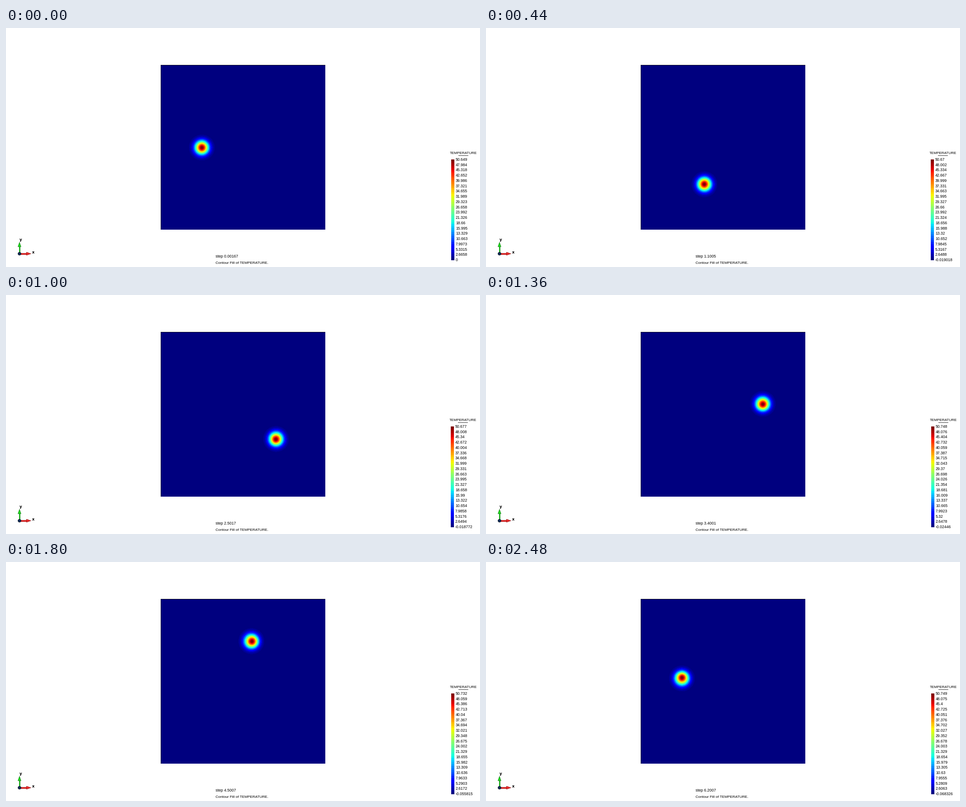
Write a matplotlib script that moves like this. It is 1054x531 px and loops after 2520 ms.

```python
import math

import matplotlib.pyplot as plt
import numpy as np
from matplotlib.animation import FuncAnimation
from matplotlib.colors import ListedColormap
from matplotlib.patches import Circle, Polygon, Rectangle
from matplotlib.transforms import Affine2D

W, H, DPI = 1054, 531, 100
FRAMES, INTERVAL = 63, 40

# Domain, orbit and blob size in pixels
LEFT, TOP, SIDE = 344, 82, 366
CX, CY = LEFT + SIDE / 2, TOP + SIDE / 2 + 0.5
ORBIT = SIDE / 4
SIGMA = 0.05606 * SIDE / 2

DT = 0.00167
LEVELS, LABELS = 50, 20
BAR_X, BAR_TOP, BAR_H = 990, 292, 223.5

# Extremes of the field at a few moments of the run
KEYS = [0, 6, 17, 25, 34, 45, 62]
MAXIMA = [50.6494, 50.6369, 50.7101, 50.6766, 50.7483, 50.732, 50.7492]
MINIMA = [0, -0.0067714, -0.033715, -0.018772, -0.02446, -0.055815, -0.068326]

plt.rcParams["font.family"] = "Liberation Sans"
jet = ListedColormap(plt.get_cmap("jet")(np.linspace(0, 1, LEVELS)))

fig = plt.figure(figsize=(W / DPI, H / DPI), dpi=DPI, facecolor="white")
ax = fig.add_axes([0, 0, 1, 1])
ax.axis("off")

px, py = np.meshgrid(LEFT + np.arange(SIDE) + 0.5, TOP + np.arange(SIDE) + 0.5)


def sim_time(i):
    """First solver step at or after each tenth of a second."""
    return max(1, math.ceil(i * 0.1 / DT - 1e-9)) * DT


def field(t):
    """Rotating Gaussian whose peak slowly falls behind its rim."""
    c, s = math.cos(t), math.sin(t)
    dx = px - (CX - ORBIT * c)
    dy = py - (CY + ORBIT * s)
    along, across = dx * s + dy * c, dx * c - dy * s
    g = np.exp(-(along**2 + across**2) / (2 * SIGMA**2))
    along = along + 0.9 * t / (2 * math.pi) * (2 * g - 0.8)
    return np.exp(-(along**2 + across**2) / (2 * SIGMA**2))


def label(x, y, s, size=8.4, **kw):
    return ax.text(x, y, s, fontsize=size * 72 / DPI, color="black",
                   va="baseline", **kw)


def box(x, y, w, h, color, **kw):
    ax.add_patch(Rectangle((x, y), w, h, fc=color, ec="none",
                           antialiased=False, **kw))


def arrow(dx, dy, color, edge):
    """Axis arrow from the triad origin along a unit direction."""
    def pt(a, b):
        return 30 + a * dx - b * dy, 501.5 + a * dy + b * dx

    shaft = [pt(0, -1.3), pt(16, -1.3), pt(16, 1.3), pt(0, 1.3)]
    head = [pt(15.5, -3.4), pt(25.5, 0), pt(15.5, 3.4)]
    for shape in (shaft, head):
        ax.add_patch(Polygon(shape, fc=color, ec=edge, lw=0.5, zorder=3))


# Domain
plate = ax.imshow(field(0), cmap=jet, vmin=0, vmax=1, aspect="auto",
                  interpolation="nearest",
                  extent=(LEFT, LEFT + SIDE, TOP + SIDE, TOP))
box(LEFT, TOP, SIDE, 1, "#101018", zorder=2)
box(LEFT, TOP, 1, SIDE, "#000030", zorder=2)

# Axis triad
arrow(1, 0, "#ee2a2a", "#8a1010")
arrow(0, -1, "#1fe01f", "#0a6a0a")
ax.add_patch(Circle((30, 501.5), 3.3, fc="#0c2a58", ec="#04101c", lw=0.6, zorder=4))
for x, y, name in ((29.5, 473, "y"), (58, 501, "x")):
    label(x, y, name, 8.5, family="DejaVu Sans", weight="bold")

# Captions
step_text = label(466.5, 510, "", 8.6)
label(466.5, 523.6, "Contour Fill of TEMPERATURE.", 8.3)

# Legend, moved as one group
shift = Affine2D()
legend = shift + ax.transData
label(987, 280.2, "TEMPERATURE", 8.15, transform=legend)
box(1006, 283, 22, 1, "#303030", transform=legend)
for k in range(LEVELS):
    y = BAR_TOP + BAR_H * (1 - (k + 1) / LEVELS)
    box(BAR_X, y, 6.5, BAR_H / LEVELS + 0.2, jet(k), transform=legend)
ticks = [label(1000, BAR_TOP + 3 + 223 * (1 - k / (LABELS - 1)), "", 8.6,
               transform=legend) for k in range(LABELS)]

ax.set_xlim(0, W)
ax.set_ylim(H, 0)


def legend_shift(low):
    """Wider lowest labels push the legend to the left."""
    if -0.01 < low < 0:
        return -4
    return -1 if -0.02 < low < -0.01 else 0


def draw(i):
    t = sim_time(i)
    plate.set_data(field(t))
    step_text.set_text(f"step {t:.5g}")
    low = np.interp(i, KEYS, MINIMA)
    high = np.interp(i, KEYS, MAXIMA)
    for tick, value in zip(ticks, np.linspace(low, high, LABELS)):
        tick.set_text(f"{value:.5g}")
    shift.clear().translate(legend_shift(low), 0)
    return [plate, step_text, *ticks]


anim = FuncAnimation(fig, draw, frames=FRAMES, interval=INTERVAL,
                     repeat=True, repeat_delay=0, blit=False)
plt.show()
```
